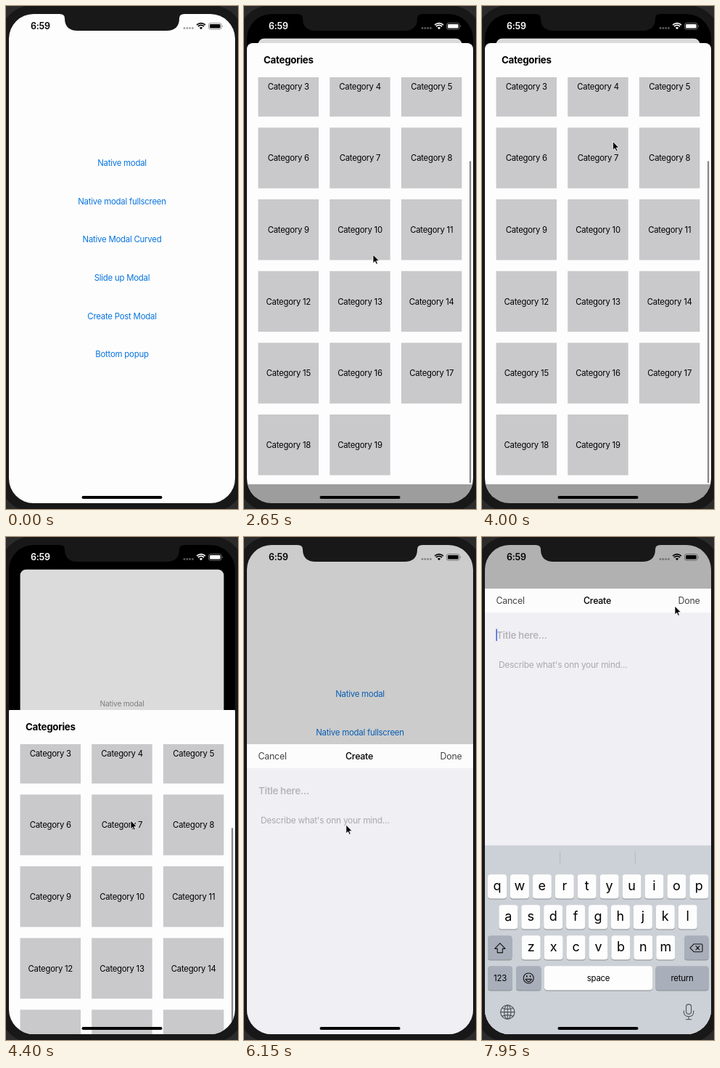
Animation of 320 by 692 pixels, one loop 8000 ms. Source, as an HTML page:

```html
<!DOCTYPE html>
<html lang="en">
<head>
<meta charset="utf-8">
<title>Modal styles</title>
<style>
  html, body { margin: 0; width: 100%; height: 100%; overflow: hidden; background: #2b2b2b; }
  svg { display: block; width: 100vw; height: 100vh; }
  text { font: 11.4px Inter, "Liberation Sans", sans-serif; letter-spacing: -.02em; }
  .mid { text-anchor: middle; }
  .bar text { font-size: 12.4px; }
  .letter { font-size: 18px; letter-spacing: 0; }
  .line { fill: none; stroke: #111; stroke-width: 1.1; stroke-linejoin: round; stroke-linecap: round; }
</style>
</head>
<body>
<svg viewBox="0 0 320 692">
  <defs>
    <clipPath id="screen"><rect x="4" y="11" width="312" height="673" rx="34"/></clipPath>
    <clipPath id="viewport"><rect x="4" y="47" width="312" height="560"/></clipPath>
  </defs>
  <rect x="-9" y="-1" width="338" height="697" rx="46" fill="#181818"/>

  <g clip-path="url(#screen)">
    <rect width="320" height="692"/>
    <g id="card">
      <rect id="page" x="4" y="11" width="312" height="673" fill="#fdfdfd"/>
      <g id="menu" class="mid"></g>
      <rect id="shade" x="4" y="11" width="312" height="673"/>
    </g>

    <g id="sheet">
      <rect id="panel" x="4" width="312" height="625" fill="#fdfdfd"/>
      <rect x="4" y="607" width="312" height="60" fill="#9d9d9d"/>
      <text x="27" y="28" style="font-size:13.3px;font-weight:700">Categories</text>
      <g clip-path="url(#viewport)"><g id="list" class="mid"></g></g>
      <rect id="thumb" x="311" width="2.2" rx="1.1" fill="#858585"/>
    </g>

    <rect id="dim" width="320" height="692"/>
    <g id="post">
      <rect x="4" y="71" width="312" height="620" fill="#efeff4"/>
      <rect x="4" y="71" width="312" height="33" fill="#fcfcfc"/>
      <g class="bar">
        <text x="19.5" y="92" fill="#444">Cancel</text>
        <text x="159" y="92" class="mid" style="font-weight:500">Create</text>
        <text x="300.5" y="92" text-anchor="end" fill="#444">Done</text>
      </g>
      <text x="20" y="139.5" fill="#b5b5ba" style="font-size:13.3px;font-weight:600">Title here...</text>
      <text x="23" y="180" fill="#a9a9ae" style="font-size:11.9px">Describe what's onn your mind...</text>
      <rect id="caret" x="19.3" y="126.5" width="1.6" height="16.5" fill="#4766d2"/>
    </g>
    <g id="keyboard" class="mid"></g>
  </g>

  <path d="M74 0V11Q81 11 81 17Q81 34 99 34H221Q239 34 239 17Q239 11 246 11V0Z" fill="#181818"/>
  <g id="status">
    <text x="34" y="32.2" style="font-size:12.5px;font-weight:600">6:59</text>
    <g opacity=".35"><circle cx="246" cy="30.5" r="1.4"/><circle cx="249.8" cy="30.5" r="1.4"/><circle cx="253.6" cy="30.5" r="1.4"/><circle cx="257.4" cy="30.5" r="1.4"/></g>
    <path d="M269 32.2L266.8 29.8Q269 28.2 271.2 29.8Z"/>
    <path d="M264.9 28Q269 24.8 273.1 28M263.1 26Q269 21.4 274.9 26" fill="none" stroke="currentColor" stroke-width="1.7"/>
    <rect x="279.5" y="23.5" width="17.6" height="8.6" rx="2.6" fill="none" stroke="currentColor" stroke-width=".9" opacity=".45"/>
    <rect x="281" y="25" width="14.6" height="5.6" rx="1.4"/>
    <path d="M298.2 26.2Q300 27.8 298.2 29.4Z" opacity=".5"/>
  </g>
  <rect id="home" x="104.5" y="674" width="111" height="4" rx="2"/>
  <path id="cursor" d="M0 0V11.8L2.7 9.3 4.5 13.3 6.4 12.5 4.7 8.6H8.3Z" stroke="#fff" stroke-width=".8"/>
</svg>

<script>
const $ = id => document.getElementById(id);
const set = (id, attrs) => { for (const k in attrs) $(id).setAttribute(k, attrs[k]); };
const move = (id, x, y) => set(id, { transform: `translate(${x} ${y})` });

// Static content
const labels = ['Native modal', 'Native modal fullscreen', 'Native Modal Curved',
  'Slide up Modal', 'Create Post Modal', 'Bottom popup'];
$('menu').innerHTML = labels.map((s, i) =>
  `<text x="160" y="${220.2 + 52.6 * i}">${s}</text>`).join('');
const items = [...$('menu').children];

$('list').innerHTML = Array.from({ length: 20 }, (_, i) => {
  const x = 19.5 + i % 3 * 98.7, y = 61 + Math.floor(i / 3) * 98.67;
  return `<rect x="${x}" y="${y}" width="83.5" height="83.5" fill="#c9c9cb"/>
    <text x="${x + 41.8}" y="${y + 46}" style="font-size:11.3px">Category ${i}</text>`;
}).join('');

const key = (x, y, w, label = '', cls = '', fill = '#fdfdfd') =>
  `<rect x="${x}" y="${y + 1}" width="${w}" height="33.2" rx="4" fill="#898c91"/>
   <rect x="${x}" y="${y}" width="${w}" height="33.2" rx="4" fill="${fill}"/>
   <text x="${x + w / 2}" y="${y + (cls ? 22 : 20.3)}" class="${cls}">${label}</text>`;
const keyRow = (letters, x, y) =>
  [...letters].map((c, i) => key(x + 30.93 * i, y, 26, c, 'letter')).join('');
const grey = '#a9afba';
$('keyboard').innerHTML = `
  <rect x="4" y="424" width="312" height="268" fill="#ccd1d7"/>
  <path d="M107.7 432V450M211.3 432V450" stroke="#b4b9bf"/>
  ${keyRow('qwertyuiop', 8, 464)}${keyRow('asdfghjkl', 23.3, 506)}${keyRow('zxcvbnm', 54.7, 548)}
  ${key(8, 548, 33.5, '', '', grey)}${key(279, 548, 33.5, '', '', grey)}
  ${key(8, 590, 34, '123', '', grey)}${key(47, 590, 34.5, '', '', grey)}
  ${key(86, 590, 149, 'space')}${key(239.5, 590, 73, 'return', '', grey)}
  <g class="line">
    <path d="M24.8 558.5L32 566H28.4V571.5H21.2V566H17.6Z"/>
    <path d="M287 565L292.3 559.6H302.5Q304 559.6 304 561V569Q304 570.4 302.5 570.4H292.3ZM295 562.4L300 567.6M300 562.4L295 567.6"/>
    <circle cx="64.2" cy="606.6" r="7"/><path d="M60 608Q64.2 615 68.4 608Z"/>
    <path d="M61.8 603.4V604.6M66.6 603.4V604.6" stroke-width="1.6"/>
    <g stroke="#4d5157">
      <circle cx="35.3" cy="653.3" r="9.6"/><ellipse cx="35.3" cy="653.3" rx="4.6" ry="9.6"/>
      <path d="M35.3 643.7V663M25.7 653.3H45M27.6 647.6Q35.3 651 43 647.6M27.6 659Q35.3 655.6 43 659"/>
      <rect x="281.6" y="642.5" width="7" height="13.5" rx="3.5"/>
      <path d="M278.4 651.5V653Q278.4 659.4 285.1 659.4T291.8 653V651.5M285.1 659.4V663.4M281.4 663.4H288.8"/>
    </g>
  </g>`;

// Motion helpers
const clamp = v => Math.min(1, Math.max(0, v));
const lerp = (a, b, k) => a + (b - a) * k;
const spring = (ms, w = .0197) => ms <= 0 ? 0 : 1 - (1 + w * ms) * Math.exp(-w * ms);

// Eased values between points [time, ...values]
function track(t, points) {
  const n = points.findIndex(p => p[0] > t);
  if (n === 0) return points[0].slice(1);
  if (n < 0) return points.at(-1).slice(1);
  const a = points[n - 1], b = points[n];
  const k = (t - a[0]) / (b[0] - a[0]), e = k * k * (3 - 2 * k);
  return a.slice(1).map((v, i) => lerp(v, b[i + 1], e));
}

const pointer = [[0, 308, 712], [50, 303, 680], [500, 170, 272], [850, 178, 318], [1050, 178, 318],
  [1400, 185, 367], [1650, 185, 367], [1900, 180, 44], [2300, 170, 60], [2450, 152, 84],
  [2500, 152, 84], [2650, 178, 342], [2900, 178, 342], [3050, 190, 40], [3250, 190, 40],
  [3550, 200, 61], [4050, 180, 190], [4100, 180, 192], [4400, 172, 390], [4900, 150, 500],
  [5300, 136, 418], [5800, 140, 418], [6600, 142, 364], [6650, 142, 364], [6950, 117, 153],
  [7150, 112, 137], [7450, 112, 137], [7950, 266, 95]];
const scrolling = [[1650, 0], [1900, 200], [2400, 142], [2900, 142], [3050, 226], [3250, 226], [3850, 142]];
const dragging = [[4100, 51], [4400, 238], [4900, 330]];
const pressCurved = [[750, 1], [850, .2], [1050, .2], [1200, 1]];
const pressPost = [[5800, 1], [5900, .25], [5950, .25], [6100, 1]];

function draw(t) {
  // The opening pauses briefly just before it settles
  const opened = spring((t < 1500 ? t : Math.max(1500, t - 150)) - 1198);
  const closed = spring(t - 5097);
  const p = opened * (1 - closed);

  const scale = 1 - .1 * p;
  set('card', { transform: `translate(160 347.5) scale(${scale}) translate(-160 -347.5)` });
  set('page', { rx: t > 1198 && t < 5900 ? lerp(34, 9, clamp(p * 4)) : 0 });
  set('shade', { opacity: .135 * p, rx: 9 * p });
  const tint = clamp(p * 2 - .5);
  set('menu', { fill: `rgb(${lerp(8, 145, tint)},${lerp(116, 145, tint)},${lerp(222, 145, tint)})` });
  items[2].setAttribute('opacity', track(t, pressCurved)[0]);
  items[4].setAttribute('opacity', track(t, pressPost)[0]);

  const top = t < 4100 ? 684 - 633 * opened : lerp(track(t, dragging)[0], 760, closed);
  move('sheet', 0, top);
  set('panel', { rx: t < 4100 ? 8 : 1 });
  const [scroll] = track(t, scrolling), over = Math.max(0, scroll - 142);
  move('list', 0, -scroll);
  set('thumb', { y: 49 + Math.min(scroll, 142) * .798 + over, height: 443 - over, opacity: t > 1650 ? 1 : 0 });

  const post = spring(t - 6000, .015);
  set('dim', { opacity: .3 * post });
  move('post', 0, 625 * (1 - post));
  set('caret', { opacity: t >= 7500 ? 1 : 0 });
  move('keyboard', 0, 270 * (1 - spring(t - 7500, .02)));

  const white = clamp((t - 1200) / 350) * (1 - clamp((t - 5097) / 253));
  const ink = `rgb(${Array(3).fill(255 * white)})`;
  set('status', { fill: ink, color: ink });
  set('home', { fill: `rgb(${Array(3).fill(320 * white * (1 - white))})` });
  move('cursor', ...track(t, pointer));
}

let start;
function frame(now) {
  start ??= now;
  draw((now - start) % 8000);
  requestAnimationFrame(frame);
}
draw(0);
requestAnimationFrame(frame);
</script>
</body>
</html>
```
